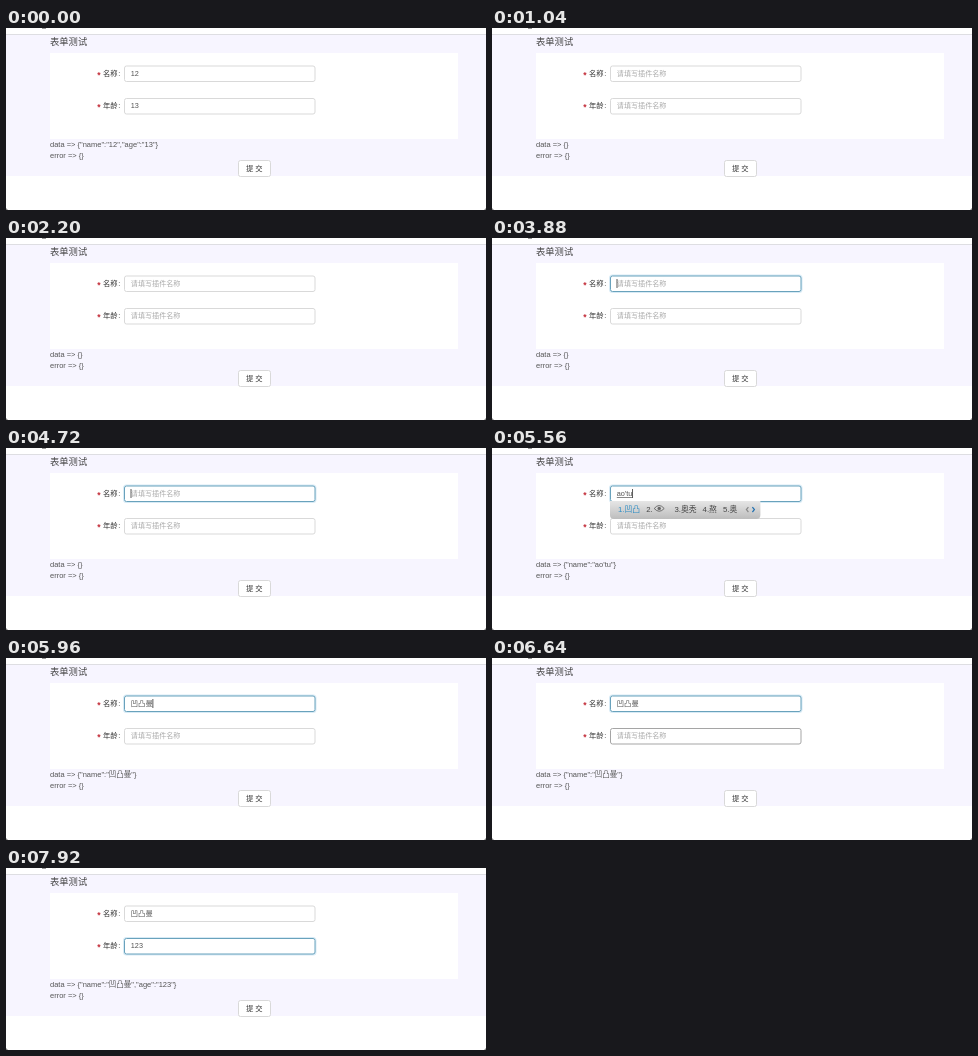
An HTML page for the animation above (8 s loop, 480 by 182 pixels).

```html
<!DOCTYPE html>
<html lang="zh">
<head>
<meta charset="utf-8">
<title>表单测试</title>
<style>
html, body { margin: 0; width: 100%; height: 100%; overflow: hidden; background: #fff; }
svg { display: block; width: 480px; height: 182px; }
text { font: 7.5px "Liberation Sans", "Noto Sans CJK SC", "Noto Sans CJK", sans-serif; fill: #555; white-space: pre; }
.title { font-size: 9.3px; fill: #444; }
.label { font-size: 7.3px; fill: #333; }
.star { font-size: 8.5px; fill: #c22a36; font-weight: bold; }
.hint { font-size: 7.1px; fill: #aaa; }
.value { font-size: 7.3px; }
.pick { font-size: 7.8px; fill: #444; }
.pick.first { fill: #2e8dc4; }
</style>
</head>
<body>
<svg viewBox="0 0 480 182">
  <defs>
    <linearGradient id="shade" x2="0" y2="1">
      <stop stop-color="#e6e6e6"/><stop offset="1" stop-color="#bdbdbd"/>
    </linearGradient>
  </defs>
  <rect width="480" height="182" fill="#fff"/>
  <rect x="36" width="4" height="1" fill="#999"/>
  <rect y="6" width="480" height="1" fill="#dedee2"/>
  <rect y="7" width="480" height="141" fill="#f7f5ff"/>
  <rect x="44" y="25" width="408" height="86" fill="#fff"/>
  <path d="M0 180v2h2zM480 180v2h-2z" fill="#888"/>
  <text class="title" x="44" y="17">表单测试</text>
  <g id="fields"></g>
  <text id="data" x="44" y="119"></text>
  <text x="44" y="130">error =&gt; {}</text>
  <rect x="232.5" y="132.5" width="32" height="16" rx="2" fill="#fff" stroke="#d9d9d9"/>
  <text class="label" x="240" y="143.2">提 交</text>
  <rect id="caret" width=".8" height="9" fill="#333"/>
  <g id="popup"></g>
</svg>
<script>
const LOOP = 8000;
const $ = id => document.getElementById(id);

function add(parent, tag, attrs, content = '') {
  const el = document.createElementNS('http://www.w3.org/2000/svg', tag);
  for (const key in attrs) el.setAttribute(key, attrs[key]);
  el.textContent = content;
  parent.append(el);
  return el;
}

const HINT = '请填写插件名称';
const MAN = '凹凸曼';
const picks = {
  "ao": ['奥', '傲', '凹', '熬', '袄', '澳', '嗷'],
  "ao'tu": ['凹凸', '', '奥秃', '熬', '奥'],
  "ao'tu'man": [MAN, '凹凸', '奥秃', '奥图', '熬', '奥']
};

// [start, name, age, composing]
const steps = [
  [0, '12', '13'],
  [80, '', ''],
  [4760, 'a', '', true],
  [5120, 'ao', '', true],
  [5440, "ao'tu", '', true],
  [5680, "ao'tu'man", '', true],
  [5960, MAN, ''],
  [7160, MAN, '1'],
  [7320, MAN, '12'],
  [7600, MAN, '123']
];

// [time, level]: 0 idle, 1 focused
const nameFocus = [[0, 0], [3040, 0], [3320, .4], [3520, .4], [3840, 1], [6720, 1], [7040, 0]];
const ageFocus = [[0, 0], [6720, 0], [7040, 1]];
const ageHover = [[0, 0], [6360, 0], [6600, 1], [6720, 1], [7000, 0]];
// [time, field index or -1, opacity]
const caretTrack = [
  [0, -1, 0], [3840, 0, 1], [4240, 0, 0], [4640, 0, 1], [5960, 0, 1],
  [6400, 0, 0], [6800, 1, 1], [7760, 1, 0]
];

const last = (track, t) => track.filter(row => row[0] <= t).pop();

function level(track, t) {
  const a = last(track, t), b = track[track.indexOf(a) + 1];
  if (!b) return a[1];
  const p = (t - a[0]) / (b[0] - a[0]);
  return a[1] + (b[1] - a[1]) * (1 - (1 - p) ** 2);
}

const mix = (a, b, p) => a.map((v, i) => Math.round(v + (b[i] - v) * p));

function makeField(label, y) {
  const g = $('fields');
  const box = { x: 118.5, y: y + .5, width: 190.5, height: 15.5, rx: 2 };
  add(g, 'text', { class: 'star', x: 91.3, y: y + 12 }, '*');
  add(g, 'text', { class: 'label', x: 97, y: y + 10.4 }, label);
  add(g, 'text', { class: 'label', x: 112.3, y: y + 10.4 }, ':');
  return {
    y,
    glow: add(g, 'rect', { ...box, fill: 'none', stroke: '#4a9fd0', 'stroke-width': 3 }),
    frame: add(g, 'rect', { ...box, fill: '#fff' }),
    text: add(g, 'text', { x: 124.8, y: y + 10.4 }),
    line: add(g, 'rect', { x: 124.8, y: y + 11.6, height: .7, fill: '#555' })
  };
}

const fields = [makeField('名称', 37.5), makeField('年龄', 70)];

function drawField(field, value, composing, focus, hover) {
  field.text.textContent = value || HINT;
  field.text.setAttribute('class', value ? 'value' : 'hint');
  field.width = value ? field.text.getComputedTextLength() : 0;
  field.line.setAttribute('width', composing ? field.width : 0);
  const idle = mix([217, 217, 217], [165, 165, 165], hover);
  field.frame.setAttribute('stroke', `rgb(${mix(idle, [105, 162, 188], focus)})`);
  field.glow.setAttribute('opacity', focus * .22);
}

let shown;
function drawPopup(key) {
  if (key === shown) return;
  shown = key;
  const g = $('popup');
  g.replaceChildren();
  if (!picks[key]) return;
  const panel = add(g, 'path', { fill: 'url(#shade)' });
  let x = 126;
  picks[key].forEach((word, i) => {
    add(g, 'text', { class: i ? 'pick' : 'pick first', x, y: 63.8 }, `${i + 1}.${word}`);
    if (!word) {
      const cx = x + 13;
      add(g, 'path', { d: `M${cx - 5} 60.5q5 -6 10 0q-5 5.5 -10 0z`, fill: 'none', stroke: '#555', 'stroke-width': .8 });
      add(g, 'circle', { cx, cy: 60.4, r: 1.7, fill: '#666' });
    }
    x += 12.6 + 7.8 * (word.length || 2);
  });
  const right = x + 17;
  panel.setAttribute('d', `M118 53H${right}V67q0 4 -4 4H122q-4 0 -4 -4z`);
  const arrow = (ax, dir, stroke) =>
    add(g, 'path', { d: `M${ax} 59.2l${dir * 2} 2.4l${-dir * 2} 2.4`, fill: 'none', stroke, 'stroke-width': 1.2 });
  arrow(right - 12, -1, '#888');
  arrow(right - 8, 1, '#1f6fb0');
}

function render(t) {
  const [, name, age, composing] = last(steps, t);
  drawField(fields[0], name, composing, level(nameFocus, t), 0);
  drawField(fields[1], age, false, level(ageFocus, t), level(ageHover, t));
  const data = { name: name || undefined, age: age || undefined };
  $('data').textContent = 'data => ' + JSON.stringify(data);
  drawPopup(composing ? name : '');

  const [, index, opacity] = last(caretTrack, t);
  const active = fields[Math.max(index, 0)];
  $('caret').setAttribute('x', 124.6 + active.width);
  $('caret').setAttribute('y', active.y + 3.5);
  $('caret').setAttribute('opacity', opacity);
}

const start = performance.now();
function tick() {
  render((performance.now() - start) % LOOP);
  requestAnimationFrame(tick);
}
tick();
</script>
</body>
</html>
```
